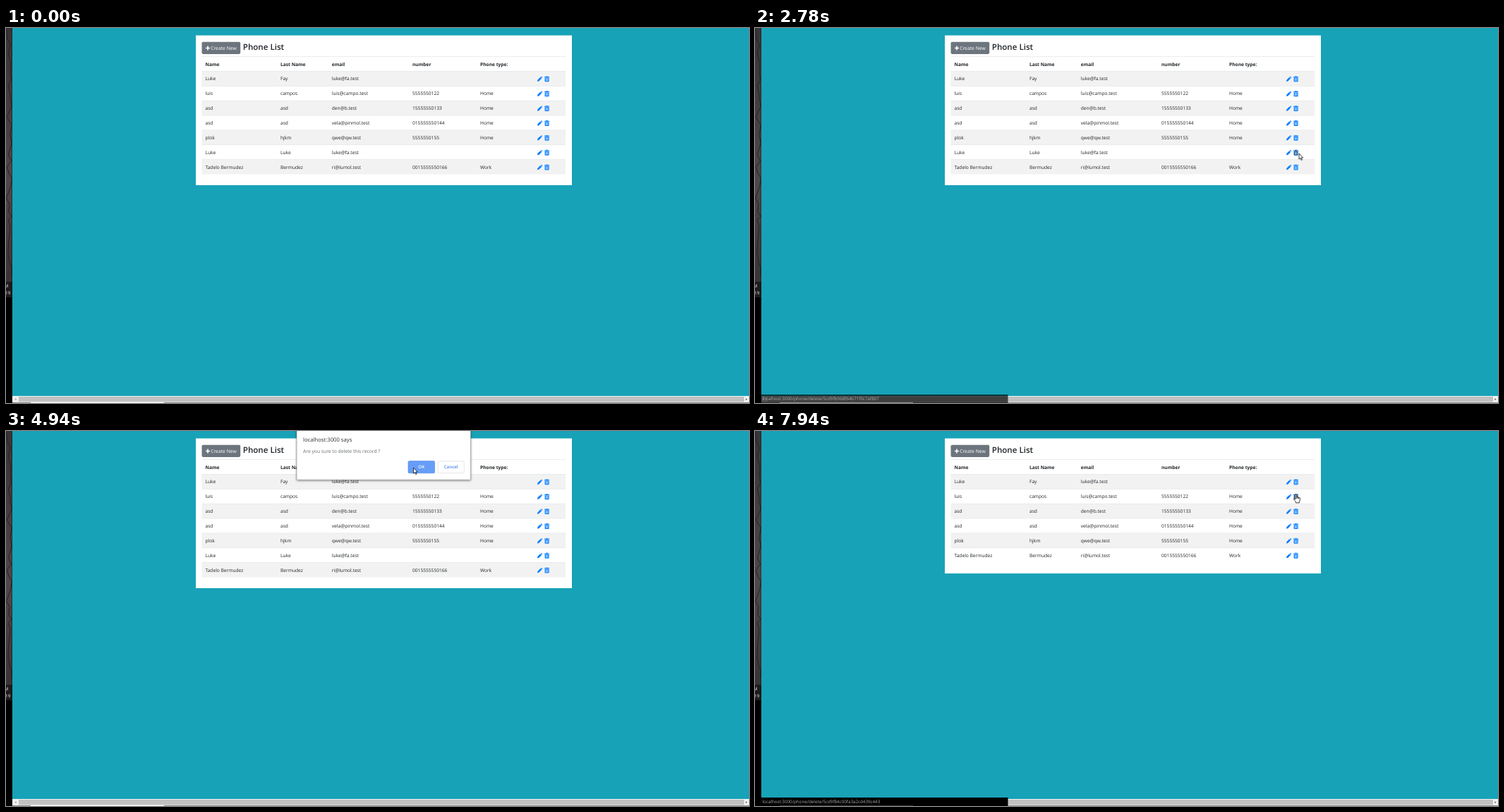
Recreate the animation shown at these times as an HTML page. Size 1053 px wide and 532 px high, loop 8 s.

```html
<!DOCTYPE html>
<html lang="en">
<head>
<meta charset="utf-8">
<title>Phone List</title>
<style>
html, body { margin: 0; width: 100%; height: 100%; overflow: hidden; background: #17a2b8; }
svg { display: block; width: 100vw; height: 100vh; }
text { font-family: "Open Sans", "Noto Sans", sans-serif; font-size: 6.65px; fill: #212529; text-rendering: geometricPrecision; white-space: pre; }
.clock { font-size: 6.2px; fill: #eee; }
.button { font-size: 6.2px; font-weight: 600; text-anchor: middle; }
</style>
</head>
<body>
<svg viewBox="0 0 1053 532" preserveAspectRatio="none">
  <defs>
    <linearGradient id="wall" x2="0" y2="1">
      <stop stop-color="#383436"/>
      <stop offset=".6" stop-color="#50474a"/>
      <stop offset="1" stop-color="#393335"/>
    </linearGradient>
    <filter id="shadow" x="-10%" y="-20%" width="120%" height="150%">
      <feDropShadow dx="0" dy="1" stdDeviation="1.6" flood-opacity=".5"/>
    </filter>
    <path id="pencil" d="M0 7.2.4 5 4.3 1.1 6.1 2.9 2.2 6.8ZM4.8.7 5.3.2Q5.7-.1 6.1.2L7 1.1Q7.3 1.5 7 1.9L6.5 2.4Z"/>
    <g id="trash">
      <path d="M0 .6H2L2.4 0H4.6L5 .6H7V1.6H0ZM.5 2.1H6.5V7.1Q6.5 7.9 5.7 7.9H1.3Q.5 7.9.5 7.1Z"/>
      <path d="M2.1 3V6.9M3.5 3V6.9M4.9 3V6.9" stroke="#fff" stroke-width=".65"/>
    </g>
  </defs>
  <rect width="1053" height="532" fill="#17a2b8"/>
  <g>
    <rect width="9" height="532"/>
    <rect width="9" height="361" fill="url(#wall)"/>
    <path id="scribble" fill="none" stroke="#252124"/>
    <rect y="360" width="9" height="22" fill="#1d1c1d"/>
    <rect x="8.6" width=".4" height="532" fill="#111"/>
    <text class="clock" x="-2.2" y="368.3">M</text>
    <text class="clock" x="-.9" y="378.3">19</text>
  </g>
  <g>
    <rect x="9" y="522" width="1044" height="10" fill="#f1f1f1"/>
    <rect id="thumb" x="18" y="523" width="1028" height="7.4"/>
    <path d="M14.5 525.2 12.5 526.7 14.5 528.2Z" fill="#8a8a8a"/>
    <path d="M1048.5 525.2 1050.5 526.7 1048.5 528.2Z" fill="#505050"/>
    <rect x="9" y="531" width="1044" height="1" fill="#8b8b8b"/>
  </g>
  <g>
    <rect id="card" x="269" y="10.5" width="533" fill="#fff"/>
    <rect x="277.5" y="19.7" width="54.7" height="17.2" rx="1.8" fill="#6c757d"/>
    <path d="M283 28.5H289M286 25.5V31.5" stroke="#fff" stroke-width="1.6"/>
    <text x="290.2" y="31" style="fill:#fff;font-size:6.8px">Create New</text>
    <text x="335.8" y="31.3" style="font-size:11.6px;font-weight:600">Phone List</text>
    <rect x="277.5" y="40.2" width="515.5" height=".6" fill="#dee2e6"/>
    <g id="heads"></g>
    <g id="rows"></g>
  </g>
  <g id="status">
    <rect x="9" y="520" width="349.5" height="12"/>
    <text id="link" x="10.5" y="528.2" style="fill:#a8a8a8;font-size:6.25px"></text>
  </g>
  <rect x="35" y="531" width="189" height="1" fill="#fff" id="underline"/>
  <g id="dialog">
    <rect x="412" y="-10" width="246.5" height="79.2" rx="1" fill="#fff" stroke="#777" stroke-width=".5" filter="url(#shadow)"/>
    <text x="421" y="15.2" style="font-size:7.7px;fill:#2b2d31">localhost:3000 says</text>
    <text x="421" y="30.8" style="font-size:6.75px;fill:#686b70">Are you sure to delete this record ?</text>
    <rect x="570" y="42.6" width="37.6" height="17.2" rx="1.6" fill="#669df6" stroke="#5188e4" stroke-width=".6"/>
    <text class="button" x="588.7" y="53.4" style="fill:#fff">OK</text>
    <rect x="612.2" y="42.8" width="37" height="16.8" rx="1.6" fill="#fff" stroke="#dadce0" stroke-width=".7"/>
    <text class="button" x="630.6" y="53.4" style="fill:#4a86e8">Cancel</text>
  </g>
  <g id="cursor" stroke="#000" stroke-width=".75" stroke-linejoin="round" fill="#fff">
    <path id="arrow" d="M0 0V8.2L1.9 6.5 3.3 9.6 4.5 9 3.1 6.1H5.6Z"/>
    <path id="hand" d="M-.9.8Q0-.5.9.8V4.4Q1.8 3.6 2.5 4.5 3.4 3.9 4 4.9 5.5 4.4 5.6 6V8.5L4.6 10.6V12.4H-.3V11L-3 7.6Q-3.4 6.2-2 6.3L-.9 7.4ZM.9 4.4V6.5M2.5 4.5V6.7M4 4.9V6.8"/>
  </g>
</svg>
<script>
const LOOP = 8000, ENTER = 130, STEP = 77.3;
const ROW = 20.88, TOP = 61.4, BIN_X = 767.5;
const COLUMNS = [282.5, 389, 461.8, 576, 672];
const PROMPT = 3390, PROMPT_READY = 3600, CONFIRM = 5000, RELOAD = 5070;
const $ = id => document.getElementById(id);
const clamp = v => Math.max(0, Math.min(1, v));
const show = (node, on) => { node.style.display = on ? "" : "none"; };

const people = [
  ["Luke", "Fay", "luke@fa.test", "", ""],
  ["luis", "campos", "luis@campo.test", "5555550122", "Home"],
  ["asd", "asd", "den@b.test", "15555550133", "Home"],
  ["asd", "asd", "vela@pinmol.test", "015555550144", "Home"],
  ["plok", "hjkm", "qwe@qw.test", "5555550155", "Home"],
  ["Luke", "Luke", "luke@fa.test", "", ""],
  ["Tadelo Bermudez", "Bermudez", "ri@lumol.test", "0015555550166", "Work"]
];
const DELETED = 5;

const cells = (values, y, weight) => values.map((value, i) =>
  `<text x="${COLUMNS[i]}" y="${y}" font-weight="${weight}">${value}</text>`).join("");

$("heads").innerHTML = cells(["Name", "Last Name", "email", "number", "Phone type:"], 53.6, 700);
$("rows").innerHTML = people.map(person => `<g>
  <rect class="stripe" x="277.5" width="515.5" height="${ROW}"/>
  <rect x="277.5" y="-.3" width="515.5" height=".6" fill="#dee2e6"/>
  ${cells(person, 13.1, 400)}
  <use href="#pencil" x="753" y="7.3" fill="#007bff"/>
  <use class="bin" href="#trash" x="763.1" y="7"/>
</g>`).join("");
const rows = [...$("rows").children];

let seed = 7;
const random = () => (seed = seed * 16807 % 2147483647) / 2147483647;
let scribble = "M0 0";
for (let y = 0; y < 352; y += 4 + random() * 14) scribble += `L${random() * 9} ${y}`;
$("scribble").setAttribute("d", scribble);

// Pointer legs: each eases from the end of the one before.
const leg = (start, end, x, y) => ({ start, end, x, y });
const legs = [
  leg(ENTER, 900, 770.5, 202),
  leg(910, 985, 770.3, 198.5),
  leg(2200, 2530, 767.5, 191.5),
  leg(2660, 2750, 771, 178),
  leg(PROMPT, 3530, 744.5, 182.5),
  leg(3540, 4330, 577, 58),
  leg(4400, 4630, 577.5, 52),
  leg(5400, 5690, 735.5, 113),
  leg(5690, 6090, 780, 123),
  leg(6200, 6700, 767, 71),
  leg(7530, 7930, 766.8, 89.5)
];

function pointerAt(t) {
  let x = 745, y = 527;
  for (const to of legs) {
    const u = clamp((t - to.start) / (to.end - to.start)), eased = u * (2 - u);
    x += (to.x - x) * eased;
    y += (to.y - y) * eased;
  }
  return { x, y };
}

// The page keeps its last state while the prompt opens.
function hoveredAt(t) {
  const { x, y } = pointerAt(t > PROMPT && t < PROMPT_READY ? PROMPT : t);
  const place = Math.floor((y - TOP) / ROW);
  const onBin = Math.abs(x - BIN_X) < 4.1 && Math.abs(y - TOP - (place + .5) * ROW) < 4.6;
  return onBin ? place : -1;
}

const links = [
  { from: 910, to: 2660, id: "5cda10347c80d53de895e438" },
  { from: 2700, to: 4330, id: "5cd9fb968f64b71f0c7af807" },
  { from: 6480, to: LOOP, id: "5cd9b21c04fa3a2cd439c440" },
  { from: 7800, to: LOOP, id: "5cd9f84c00fa3a2cd439c443" }
];
const FADE = 300;
const linkAlpha = ({ from, to }, t) => Math.min(clamp((t - from) / FADE), 1 - clamp((t - to) / FADE));

function draw(time) {
  const t = time < ENTER ? 0 : ENTER + Math.floor((time - ENTER) / STEP) * STEP;
  const removed = t >= RELOAD, hovered = hoveredAt(t), tip = pointerAt(t);

  rows.forEach((row, i) => {
    const place = removed && i > DELETED ? i - 1 : i;
    show(row, !(removed && i === DELETED));
    row.setAttribute("transform", `translate(0 ${TOP + place * ROW})`);
    row.querySelector(".stripe").setAttribute("fill", place % 2 ? "#fff" : "#f2f2f2");
    row.querySelector(".bin").setAttribute("fill", hovered === place ? "#004b9b" : "#007bff");
  });
  $("card").setAttribute("height", 212.5 - (removed ? ROW : 0));

  const alpha = Math.max(...links.map(link => linkAlpha(link, t)));
  const current = links.filter(link => link.from <= t).pop();
  $("status").style.opacity = alpha;
  $("underline").style.opacity = 1 - alpha * .8;
  $("link").textContent = current ? "localhost:3000/phone/delete/" + current.id : "";
  $("dialog").style.opacity = t < CONFIRM ? clamp((t - PROMPT) / 100) : 0;

  const hand = hoveredAt(t - STEP) >= 0;
  $("thumb").setAttribute("fill", t && tip.y > 521 ? "#a8a8a8" : "#c1c1c1");
  $("cursor").setAttribute("transform", `translate(${tip.x} ${tip.y})`);
  show($("cursor"), t > 0);
  show($("hand"), hand);
  show($("arrow"), !hand);
}

const begin = performance.now();
function tick() {
  draw((performance.now() - begin) % LOOP);
  requestAnimationFrame(tick);
}
tick();
</script>
</body>
</html>
```
